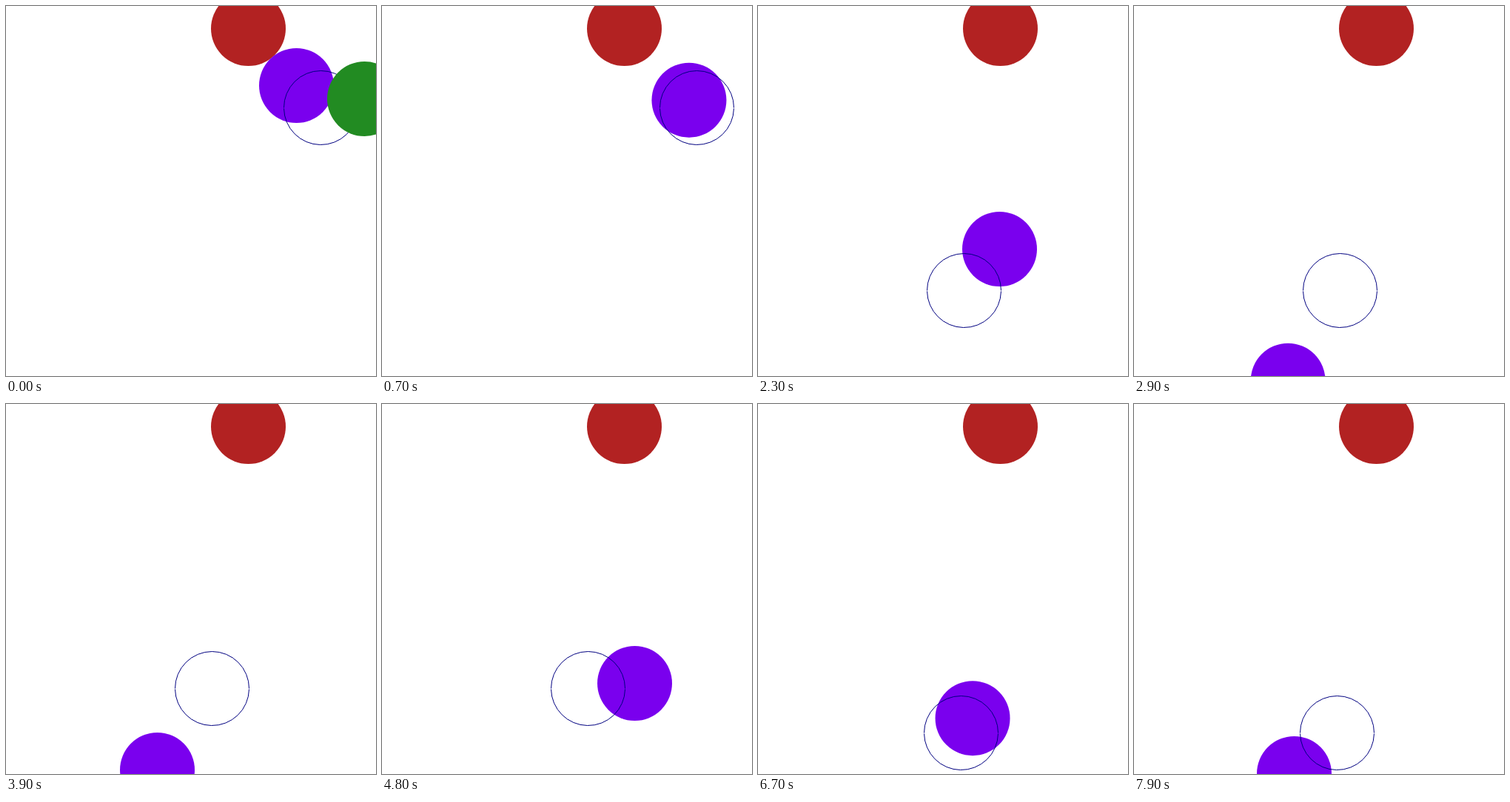
These frames come from a looping animation (500 px wide and 500 px high, 8 s). An HTML page with a canvas:

```html
<!DOCTYPE html>
<html lang="en">
<head>
<meta charset="utf-8">
<title>Chasing circle</title>
<style>
  html, body { margin: 0; width: 100%; height: 100%; overflow: hidden; background: #fff; }
  canvas { display: block; }
</style>
</head>
<body>
<canvas id="stage" width="500" height="500"></canvas>
<script>
const ctx = document.getElementById('stage').getContext('2d');
const TICK = 100, TICKS = 80;

// Chaser path: tick, x, y
const path = [
  [0, 392.5, 107.5], [9, 422, 133.5], [13, 437.5, 147.5], [15, 439.5, 152.5],
  [18, 416.5, 187.5], [23, 326.5, 328.5], [27, 242.5, 458.5], [31, 181, 536],
  [34, 158, 534], [36, 172, 519], [39, 204.5, 494.5], [45, 297.5, 425.5],
  [48, 341.5, 377.5], [54, 377, 310.5], [59, 362.5, 306.5], [63, 335, 353.5],
  [72, 234.5, 500.5], [76, 213, 509], [79, 216.5, 499.5]
];

// Goal ring: tick of the jump, x, y
const goals = [[0, 425.5, 137.5], [13, 278.5, 384.5], [57, 274.5, 444.5]];

const slope = (i, k) => (path[i + 1][k] - path[i][k]) / (path[i + 1][0] - path[i][0]);

function tangent(i, k) {
  if (i === 0) return slope(0, k);
  if (i === path.length - 1) return slope(i - 1, k);
  const before = path[i][0] - path[i - 1][0];
  const after = path[i + 1][0] - path[i][0];
  return (slope(i - 1, k) * after + slope(i, k) * before) / (before + after);
}

// Cubic Hermite curve through the path points
function chaser(tick) {
  let i = 0;
  while (i < path.length - 2 && path[i + 1][0] <= tick) i++;
  const a = path[i], b = path[i + 1];
  const h = b[0] - a[0], u = (tick - a[0]) / h, v = 1 - u;
  return [1, 2].map(k =>
    v * v * (1 + 2 * u) * a[k] + u * u * (3 - 2 * u) * b[k] +
    h * u * v * (v * tangent(i, k) - u * tangent(i + 1, k)));
}

function disc(x, y, color) {
  ctx.fillStyle = color;
  ctx.beginPath();
  ctx.arc(x, y, 50.5, 0, Math.PI * 2);
  ctx.fill();
}

// Two half arcs with a hairline gap on either side
function ring(x, y) {
  const gap = 0.02;
  ctx.strokeStyle = '#000080';
  ctx.lineWidth = 1;
  for (const start of [0, Math.PI]) {
    ctx.beginPath();
    ctx.arc(x, y, 50, start + (start ? 0 : gap), start + Math.PI - (start ? 0 : gap));
    ctx.stroke();
  }
}

function draw(tick) {
  ctx.fillStyle = '#fff';
  ctx.fillRect(0, 0, 500, 500);
  disc(327.5, 30.5, '#b22222');
  disc(...chaser(tick), '#7a00ee');
  const [, x, y] = goals.filter(g => g[0] <= tick).pop();
  ring(x, y);
  disc(484.5 + 12 * tick, 125.5 - 2 * tick, '#228b22');
}

const began = performance.now();
function loop() {
  const time = Math.max(0, performance.now() - began);
  draw(Math.floor(time / TICK) % TICKS);
  requestAnimationFrame(loop);
}
loop();
</script>
</body>
</html>
```
